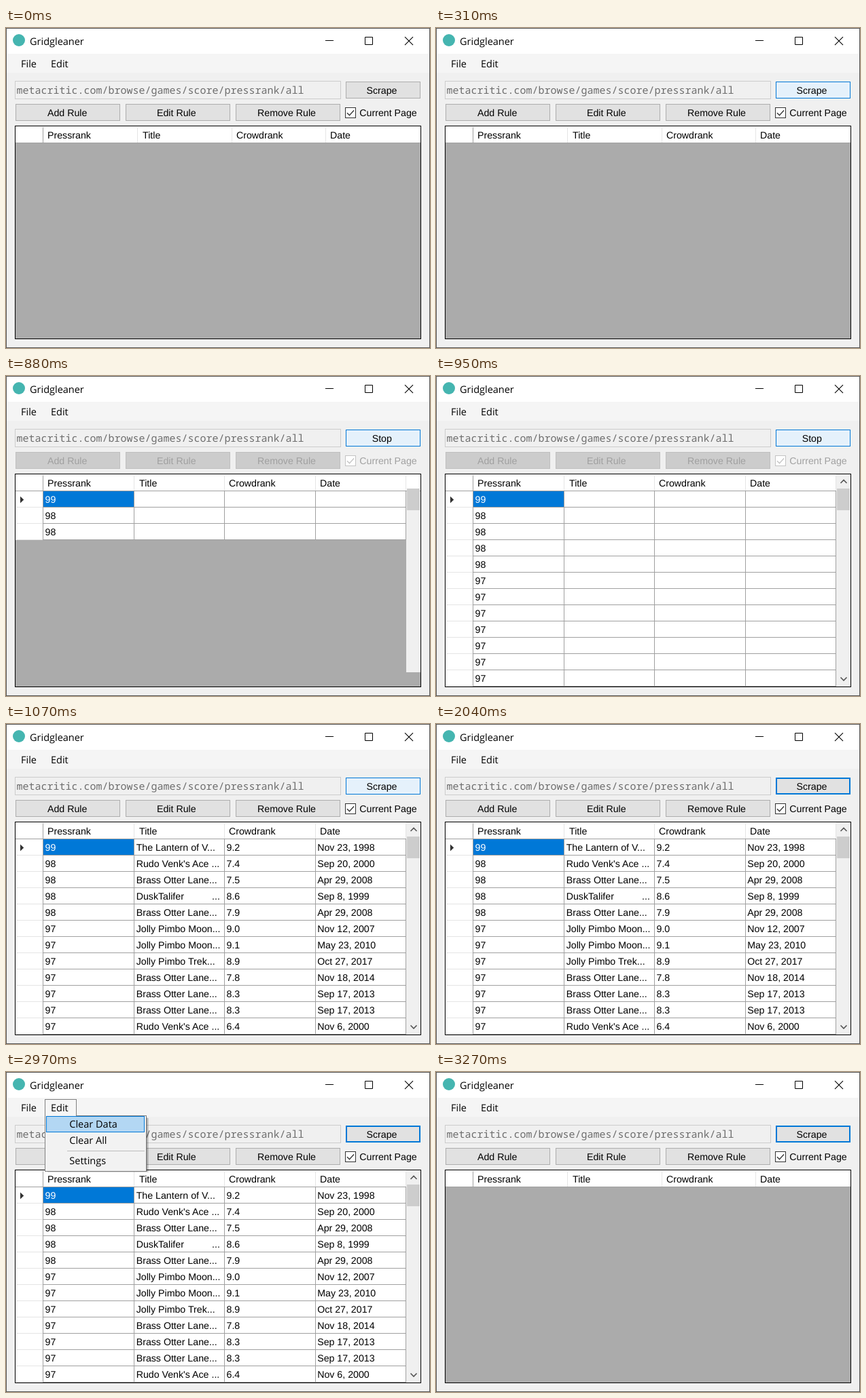
Recreate the animation shown at these times as an HTML page. Size 624 px wide and 472 px high, loop 3580 ms.

```html
<!DOCTYPE html>
<html lang="en">
<head>
<meta charset="utf-8">
<title>Gridgleaner</title>
<style>
html, body { margin: 0; width: 100%; height: 100%; overflow: hidden; background: #f0f0f0; }
svg { display: block; width: 100%; height: 100%; }
text { white-space: pre; text-rendering: geometricPrecision; }
.ui { font: 14.2px "Liberation Sans", Arial, sans-serif; }
.menu { font: 14.5px "Open Sans", "Noto Sans", sans-serif; }
.mono { font: 15px "Noto Sans Mono", "DejaVu Sans Mono", monospace; }
</style>
</head>
<body>
<svg id="stage" viewBox="0 0 624 472"></svg>
<script>
const LOOP = 3580;
const BLUE = '#0078d7', LINE = '#a0a0a0', PALE = '#e5e5e5';
const HEADS = ['Pressrank', 'Title', 'Crowdrank', 'Date'];
const WIDE = { edges: [54, 193, 332, 470], text: [61, 201, 339, 477] };
const NARROW = { edges: [54, 188, 321, 455, 588], text: [61, 196, 328, 462] };
const CELL_X = [57.5, 191.7, 324.5, 458.2];
const ROWS = `99|The Lantern of V...|9.2|Nov 23, 1998
98|Rudo Venk's Ace ...|7.4|Sep 20, 2000
98|Brass Otter Lane...|7.5|Apr 29, 2008
98|DuskTalifer|8.6|Sep 8, 1999
98|Brass Otter Lane...|7.9|Apr 29, 2008
97|Jolly Pimbo Moon...|9.0|Nov 12, 2007
97|Jolly Pimbo Moon...|9.1|May 23, 2010
97|Jolly Pimbo Trek...|8.9|Oct 27, 2017
97|Brass Otter Lane...|7.8|Nov 18, 2014
97|Brass Otter Lane...|8.3|Sep 17, 2013
97|Brass Otter Lane...|8.3|Sep 17, 2013
97|Rudo Venk's Ace ...|6.4|Nov 6, 2000`.split('\n').map(r => r.split('|'));

// Each step changes some of the state and keeps the rest.
const STEPS = [
  [0, { button: 'idle', busy: false, rows: 0, cols: 0, menu: '' }],
  [310, { button: 'hover' }],
  [630, { button: 'down' }],
  [700, { button: 'hover', busy: true }],
  [880, { rows: 3, cols: 1 }],
  [950, { rows: 12, cols: 1 }],
  [1010, { cols: 3 }],
  [1070, { busy: false, cols: 4 }],
  [2040, { button: 'focus' }],
  [2350, { menu: 'hover' }],
  [2660, { menu: 'open' }],
  [2970, { menu: 'pick' }],
  [3270, { rows: 0, cols: 0, menu: '' }]
];

const fill = (x, y, w, h, color) =>
  `<rect x="${x}" y="${y}" width="${w}" height="${h}" fill="${color}"/>`;

// Filled box with its border drawn inside the given size.
const box = (x, y, w, h, color, edge, t = 1) =>
  `<rect x="${x + t / 2}" y="${y + t / 2}" width="${w - t}" height="${h - t}" fill="${color}" stroke="${edge}" stroke-width="${t}"/>`;

const label = (x, y, str, cls = 'ui', color = '#000') =>
  `<text x="${x}" y="${y}" class="${cls}" fill="${color}">${str}</text>`;

const stroke = (d, color, w = 1) =>
  `<path d="${d}" fill="none" stroke="${color}" stroke-width="${w}"/>`;

function drawWindow() {
  return fill(0, 0, 624, 472, '#f0f0f0') + fill(0, 0, 624, 38, '#fff') +
    fill(0, 38, 624, 28, '#f5f5f5') +
    box(0, 0, 624, 472, 'none', '#555') +
    '<circle cx="19" cy="18" r="9" fill="#45b5b0"/>' +
    label(35, 25, 'Gridgleaner', 'menu') +
    stroke('M470 18.5H482M528.5 13.5H539.5V24.5H528.5Z', '#000') +
    stroke('M587 13.2L599 25.2M599 13.2L587 25.2', '#000', 1.1) +
    label(22, 58, 'File', 'menu');
}

function drawControls({ button, busy }) {
  const [color, edge, t] = {
    idle: ['#e1e1e1', '#adadad', 1],
    hover: ['#e5f1fb', BLUE, 1],
    down: ['#cce4f7', '#005499', 1],
    focus: ['#e1e1e1', BLUE, 2]
  }[button];
  const ink = busy ? '#a0a0a0' : '#000';
  const mark = busy ? '#c4c4c4' : '#333';
  const rules = [[14, 61, 'Add'], [176, 222, 'Edit'], [338, 370, 'Remove']];
  return box(13, 78, 480, 27, '#f0f0f0', '#ccc') +
    label(15.5, 97, 'metacritic.com/browse/games/score/pressrank/all', 'mono', '#6d6d6d') +
    box(500, 79, 110, 25, color, edge, t) +
    (busy ? label(538.7, 97, 'Stop') : label(530.5, 97, 'Scrape')) +
    rules.map(([x, tx, name]) =>
      box(x, 112, 154, 25, busy ? '#ccc' : '#e1e1e1', busy ? '#bfbfbf' : '#adadad') +
      label(tx, 130, name + ' Rule', 'ui', ink)).join('') +
    box(499, 117, 16, 16, '#fff', mark) +
    stroke('M502 125.2L505.5 128.7L512 121.5', mark, 1.4) +
    label(520.3, 130, 'Current Page', 'ui', ink);
}

function drawScrollbar(full) {
  const bar = full ? fill(589, 145, 21, 313, '#f0f0f0') : fill(589, 170, 21, 267, '#f0f0f0');
  const arrows = stroke('M595.5 158L600 153.5L604.5 158M595.5 444.5L600 449L604.5 444.5', '#555', 1.6);
  return bar + fill(590, 166, 19, 32, '#cdcdcd') + (full ? arrows : '');
}

function drawRow(row, i, cols) {
  const y = 170 + 24 * i;
  let out = fill(14, y, 575, 24, '#fff') +
    fill(15, y + 23, 39, 1, PALE) + fill(54, y + 23, 535, 1, LINE);
  if (!i) out += fill(55, y, 133, 23, BLUE) + '<path d="M21 177.5L26.2 182.5L21 187.5Z" fill="#333"/>';
  row.slice(0, cols).forEach((str, c) => {
    out += label(CELL_X[c], y + 17, str, 'ui', i || c ? '#000' : '#fff');
  });
  if (i === 3 && cols > 1) out += label(303, y + 17, '...');
  return out;
}

function drawGrid({ rows, cols }) {
  const { edges, text } = rows ? NARROW : WIDE;
  let out = fill(14, 145, 596, 313, '#ababab') + fill(14, 145, 596, 24, '#fff') +
    fill(14, 169, rows ? 575 : 596, 1, LINE);
  out += ROWS.slice(0, rows).map((row, i) => drawRow(row, i, cols)).join('');
  edges.forEach((x, i) => {
    out += fill(x, 146, 1, 23, i ? PALE : LINE);
    if (rows) out += fill(x, 169, 1, 24 * rows + 1, LINE);
  });
  HEADS.forEach((name, i) => { out += label(text[i], 163, name); });
  if (rows) out += drawScrollbar(rows === ROWS.length);
  return out + box(13, 144, 598, 315, 'none', '#000');
}

function drawMenu({ menu }) {
  const edit = label(66, 58, 'Edit', 'menu');
  if (!menu) return edit;
  if (menu === 'hover') return box(57, 40, 47, 24, '#b3d7f3', BLUE) + edit;
  return fill(61, 68, 149, 80, 'rgba(0,0,0,.16)') + fill(60, 67, 148, 80, 'rgba(0,0,0,.25)') +
    box(57, 64, 150, 83, '#f2f2f2', '#808080') +
    box(57, 40, 47, 26, '#f6f6f6', '#808080') + fill(58, 64, 45, 2, '#f2f2f2') +
    (menu === 'pick' ? box(59, 65, 145, 24, '#b3d7f3', BLUE) : '') + edit +
    label(93.3, 82, 'Clear Data', 'menu') +
    label(93.3, 106, 'Clear All', 'menu') +
    fill(90, 116, 114, 1, '#bdbdbd') +
    label(93.3, 136, 'Settings', 'menu');
}

const stage = document.getElementById('stage');
let shown = 0;

function render(t) {
  const count = STEPS.filter(([start]) => start <= t).length;
  if (count === shown) return;
  shown = count;
  const state = Object.assign({}, ...STEPS.slice(0, count).map(step => step[1]));
  stage.innerHTML = drawWindow() + drawControls(state) + drawGrid(state) + drawMenu(state);
}

const begin = performance.now();
function tick() {
  render((performance.now() - begin) % LOOP);
  requestAnimationFrame(tick);
}
tick();
</script>
</body>
</html>
```
